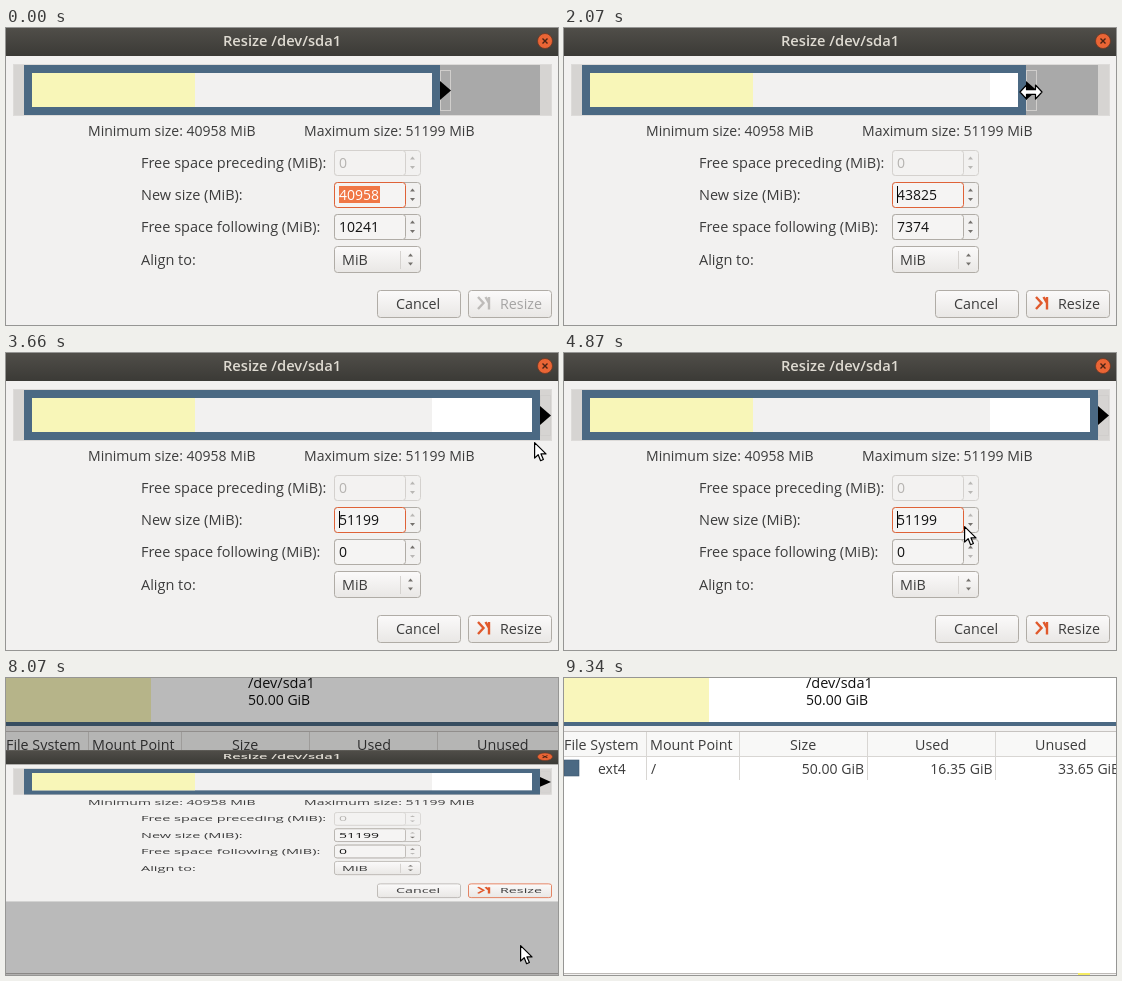
An HTML page that plays this animation: 552x297 px, repeating every 9.42 s.

```html
<!DOCTYPE html>
<html lang="en">
<head>
<meta charset="utf-8">
<title>Resize dialog</title>
<style>
html, body { margin: 0; width: 100%; height: 100%; overflow: hidden; background: #fff; }
svg { display: block; width: 552px; height: 297px; }
text { font: 14px "Open Sans", "Noto Sans", sans-serif; fill: #3c3c3c; white-space: pre; }
.label { font-size: 14.5px; }
.head, .btn { font-size: 14.3px; }
.title { font-size: 14.7px; font-weight: 600; fill: #dfdbd2; }
.dark { fill: #111; }
.dim { fill: #b5b3b0; }
</style>
</head>
<body>
<svg id="stage" viewBox="0 0 552 297" xmlns="http://www.w3.org/2000/svg">
  <defs>
    <linearGradient id="bar" x2="0" y2="1"><stop stop-color="#504e49"/><stop offset="1" stop-color="#3b3a36"/></linearGradient>
    <linearGradient id="btn" x2="0" y2="1"><stop stop-color="#fbfafa"/><stop offset="1" stop-color="#e9e7e5"/></linearGradient>
  </defs>
  <g id="table"></g>
  <rect id="shade" width="552" height="297"/>
  <g id="dialog"></g>
  <g id="pointer" fill="#fff" stroke="#000" stroke-width="1.2" stroke-linejoin="round">
    <path id="arrow" d="M.6 .6V16.1L4.2 12.7 6.6 18.7 9.4 17.5 7 11.9H12Z"/>
    <path id="resize" d="M-11 0-4.5-7V-2.3H4.5V-7L11 0 4.5 7V2.3H-4.5V7Z"/>
    <path id="beam" d="M-3-8Q0-8 0-6V6Q0 8-3 8M3-8Q0-8 0-6M0 6Q0 8 3 8" fill="none"/>
  </g>
</svg>
<script>
const LOOP = 9420, MIN = 40958, SPAN = 10241;
const LINE = "#b0aca6", ACCENT = "#df6237";
const $ = id => document.getElementById(id);

const rect = (x, y, w, h, fill, extra = "") =>
  `<rect x="${x}" y="${y}" width="${w}" height="${h}" fill="${fill}" ${extra}/>`;
const text = (x, y, s, extra = "") => `<text x="${x}" y="${y}" ${extra}>${s}</text>`;
const box = (x, y, w, h, fill, id = "") =>
  rect(x + .5, y + .5, w - 1, h - 1, fill, `rx="3" stroke="${LINE}" ${id && `id="${id}"`}`);
const tri = (x, y, dir, id = "") =>
  `<path d="M${x - 2.5} ${y}h5l-2.5 ${3 * dir}z" fill="#74716d" ${id && `id="${id}"`}/>`;

function spin(y, id, value, off) {
  const faint = off ? 'opacity=".45"' : "";
  return `<g ${faint}>` + box(328, y, 87, 26, "#f2f1f0")
    + tri(406.5, y + 9.5, -1, id + "Up") + tri(406.5, y + 16, 1, id + "Down")
    + box(328, y, 72, 26, "#f5f4f3", id + "Box") + "</g>"
    + (id === "size" ? rect(333, 158, 41, 17, "#f07746", 'id="select"') : "")
    + text(333, y + 18, value, `id="${id}" class="${off ? "dim" : "dark"}"`);
}

function buildTable() {
  let s = rect(0, 0, 552, 297, "#fff")
    + rect(0, 0, 145, 44, "#f9f6bb") + rect(0, 44, 552, 4, "#4b6983")
    + text(242, 10, "/dev/sda1", 'class="dark label"') + text(242, 27, "50.00 GiB", 'class="dark"')
    + rect(0, 48, 552, 5, "#f2f1f0") + rect(0, 53, 552, 1, "#c6c3c0")
    + rect(0, 54, 552, 24, "#f8f8f7") + rect(0, 78, 552, 1, "#d8d6d3");
  for (const x of [82, 175, 303, 431]) s += rect(x, 54, 1, 48, "#d8d6d3");
  const heads = [[0, "File System"], [86, "Mount Point"], [226, "Size"], [351, "Used"], [471, "Unused"]];
  for (const [x, h] of heads) s += text(x, 72, h, 'class="head"');
  s += rect(0, 82, 15, 16, "#4b6983", 'stroke="#3d5870" stroke-width=".6"')
    + text(34, 96, "ext4") + text(87, 96, "/")
    + text(300, 96, "50.00 GiB", 'text-anchor="end"')
    + text(428.5, 96, "16.35 GiB", 'text-anchor="end"') + text(494, 96, "33.65 GiB")
    + rect(0, 295, 552, 1, "#bdbab7") + rect(0, 296, 552, 1, "#f2f1f0")
    + rect(514, 295, 12, 2, "#f5ec62", 'id="mark"');
  $("table").innerHTML = s;
}

function buildDialog() {
  let s = rect(0, 0, 552, 297, "#f2f1f0") + rect(0, 0, 552, 28, "url(#bar)")
    + text(276, 18, "Resize /dev/sda1", 'text-anchor="middle" class="title"')
    + '<circle cx="539" cy="13" r="7.5" fill="#ea6535" stroke="#6e3824" stroke-width=".8"/>'
    + '<path d="M536.5 10.5l5 5m0-5l-5 5" stroke="#4a2314" stroke-width="1.4"/>';

  s += rect(7.5, 36.5, 538, 51, "#d6d4d2", 'stroke="#dddbd9"')
    + rect(18, 37, 516, 50, "#a9a9a9")
    + rect(18, 37, 416, 50, "#4b6983", 'id="used"')
    + rect(26, 45, 400, 34, "#f2f1f0") + rect(426, 45, 0, 34, "#fff", 'id="grown"')
    + rect(26, 45, 163, 34, "#f8f6b8")
    + '<g id="grip"><rect x=".5" y="42.5" width="10" height="40" fill="none" stroke="#d0cecc"/>'
    + '<path d="M0 53L11 62.5 0 72Z" fill="#000"/></g>';

  s += text(82, 108, "Minimum size: 40958 MiB") + text(298, 108, "Maximum size: 51199 MiB");
  const labels = ["Free space preceding (MiB):", "New size (MiB):", "Free space following (MiB):", "Align to:"];
  labels.forEach((l, i) => s += text(135, [140, 172, 204, 237][i], l, 'class="label"'));
  s += spin(122, "before", "0", true) + spin(154, "size", "") + spin(186, "after", "")
    + rect(333, 158, 1, 17, "#000", 'id="caret"');

  s += box(328, 218, 87, 27, "url(#btn)") + text(336, 237, "MiB", 'class="btn"')
    + rect(394, 223, 1, 18, "#d5d2cf") + tri(404.5, 228.5, -1) + tri(404.5, 234.5, 1);
  s += box(371, 262, 84, 28, "url(#btn)") + text(390, 281, "Cancel", 'class="btn"')
    + box(462, 262, 84, 28, "url(#btn)", "okBox")
    + '<g id="ok"><path id="icon" d="M472 269L477.5 275 472 281M479.5 269L483 275V269V281.5" fill="none" stroke-width="2.4"/>'
    + text(494, 281, "Resize", 'class="btn"') + "</g>";
  $("dialog").innerHTML = s;
}

const linear = k => k, smooth = k => k * k * (3 - 2 * k), out = k => 1 - (1 - k) ** 2.2;
// time, x, y, easing used to get there
const path = [
  [0, 288, 114], [400, 288, 114], [840, 439, 64, smooth],
  [1370, 439, 64], [1470, 446, 64], [1810, 446, 64], [2590, 509, 64], [2750, 526, 64], [3260, 541, 64, out],
  [3410, 541, 64], [3420, 540, 64], [3550, 540, 64], [4060, 440, 267, smooth],
  [4530, 440, 267], [4870, 400, 173, smooth], [5040, 386, 174, out],
  [5380, 386, 174], [5860, 541, 54, smooth], [5940, 541, 57],
  [6120, 541, 57], [6800, 514, 266, out], [7250, 514, 266], [7260, 514, 267],
  [8520, 514, 267], [8620, 513, 297]
];

function pointerAt(t) {
  const i = path.findIndex(p => p[0] > t);
  if (i < 0) return [513, 297];
  const [t0, x0, y0] = path[i - 1], [t1, x1, y1, ease = linear] = path[i];
  const k = ease((t - t0) / (t1 - t0));
  return [Math.round(x0 + (x1 - x0) * k), Math.round(y0 + (y1 - y0) * k)];
}

const within = (t, a, b) => t >= a && t < b;
const show = (id, on) => $(id).setAttribute("visibility", on ? "visible" : "hidden");
const set = (id, name, v) => $(id).setAttribute(name, v);

function draw(t) {
  const [x, y] = pointerAt(t);
  const edge = t < 1370 ? 434 : t < 3260 ? Math.min(534, Math.max(434, x - 5)) : 534;
  const size = Math.round(MIN + (edge - 434) / 100 * SPAN);
  const moved = t >= 1390, pressed = t >= 7690;

  set("used", "width", edge - 18);
  set("grown", "width", edge - 434);
  set("grip", "transform", `translate(${edge} 0)`);
  $("size").textContent = size;
  $("after").textContent = MIN + SPAN - size;
  $("size").style.fill = moved ? "" : "#fff";
  show("select", !moved);
  set("sizeUp", "opacity", edge === 534 ? .45 : 1);
  set("afterDown", "opacity", edge === 534 ? .45 : 1);
  set("sizeBox", "stroke", pressed ? LINE : ACCENT);
  set("okBox", "stroke", pressed ? ACCENT : LINE);
  set("ok", "opacity", moved ? 1 : .42);
  set("icon", "stroke", moved ? "#e0592c" : "#77736f");

  const blank = within(t, 3200, 3600) || within(t, 4400, 4800) || within(t, 5910, 6310) || t >= 7110;
  set("caret", "x", t < 5250 ? 333 : 373);
  show("caret", moved && !blank);

  // The dialog folds vertically while the window behind it brightens.
  const fold = t < 8070 ? 1 : Math.max(0, .517 * (1 - (t - 8070) / 70));
  set("dialog", "transform", `translate(0 ${147 * (1 - fold)}) scale(1 ${fold})`);
  $("dialog").style.display = fold ? "" : "none";
  set("shade", "opacity", .27 * Math.min(1, Math.max(0, (8300 - t) / 200)));
  show("mark", t >= 9340);

  const onGrip = Math.abs(y - 62) < 25 && Math.abs(x - edge - 5) <= 8;
  const onEntry = within(x, 329, 399) && within(y, 154, 180);
  $("pointer").style.display = within(t, 30, 8620) ? "" : "none";
  set("pointer", "transform", `translate(${x} ${y})`);
  const shape = t >= 8070 ? "arrow" : onGrip ? "resize" : onEntry ? "beam" : "arrow";
  for (const id of ["arrow", "resize", "beam"]) $(id).style.display = id === shape ? "" : "none";
}

buildTable();
buildDialog();
const start = performance.now();
function tick() {
  draw((performance.now() - start) % LOOP);
  requestAnimationFrame(tick);
}
tick();
</script>
</body>
</html>
```
